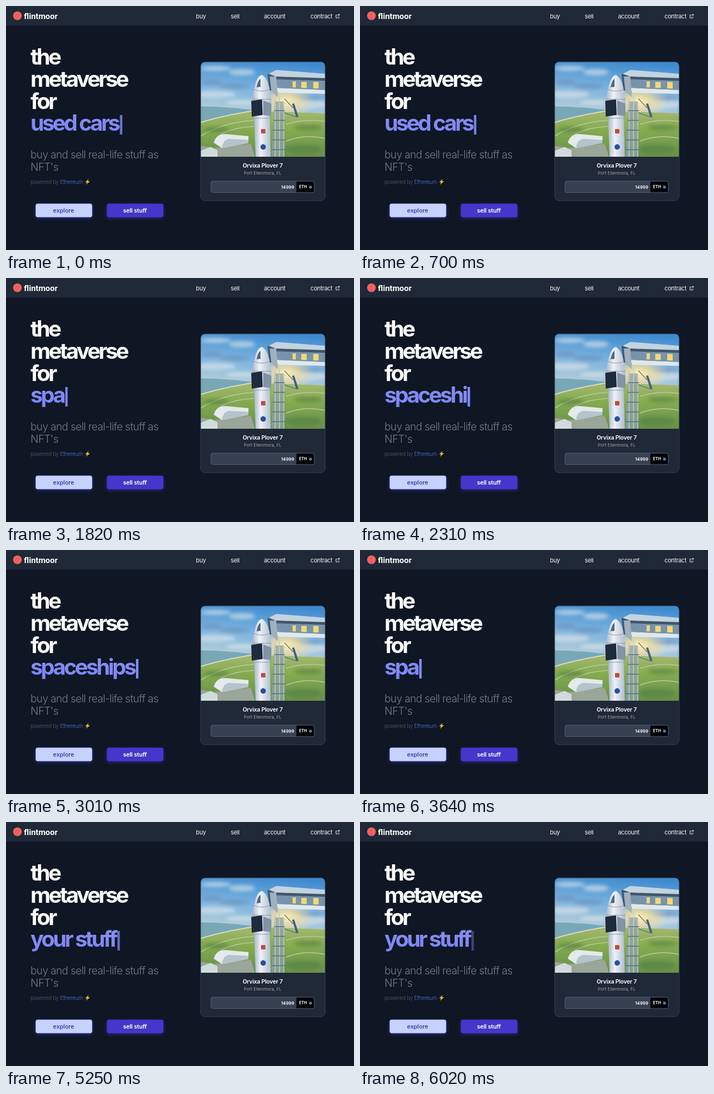
Recreate the animation shown at these times as an HTML page. Size 640 by 450 pixels, loop 6.09 s.

```html
<!DOCTYPE html>
<html lang="en">
<head>
<meta charset="utf-8">
<title>Marketplace landing page</title>
<style>
html, body { margin: 0; width: 100%; height: 100%; overflow: hidden; background: #0f1624; }
svg { display: block; width: 640px; height: 450px; font-family: Inter, "Open Sans", sans-serif; font-optical-sizing: none; }
text { white-space: pre; }
.nav { font-size: 11px; letter-spacing: -.035em; fill: #f3f4f6; }
.brand { font: 700 15px Roboto, sans-serif; fill: #fff; }
.hero { font-size: 40.5px; font-weight: 700; letter-spacing: -.088em; fill: #fff; }
.lead { font-size: 19.5px; font-weight: 300; letter-spacing: -.034em; fill: #737a88; }
.note { font-size: 10px; font-weight: 300; letter-spacing: -.03em; fill: #535d6c; }
.button { font-size: 11px; font-weight: 500; letter-spacing: -.02em; text-anchor: middle; }
.button rect { filter: drop-shadow(0 2px 3px #312ea8c0); }
.title { font-size: 10.5px; font-weight: 600; letter-spacing: -.02em; fill: #fff; text-anchor: middle; }
.place { font-size: 8px; fill: #9ca3af; text-anchor: middle; }
.price { font-size: 8px; font-weight: 600; fill: #fff; text-anchor: end; }
.unit { font-size: 7px; font-weight: 700; fill: #fff; }
</style>
</head>
<body>
<svg viewBox="0 0 640 450">
  <defs>
    <linearGradient id="sky" x1=".6" y1="0" x2=".4" y2="1">
      <stop offset="0" stop-color="#3f8bd0"/>
      <stop offset=".5" stop-color="#7db4df"/>
      <stop offset="1" stop-color="#c3d4d8"/>
    </linearGradient>
    <linearGradient id="land" x1="0" y1="0" x2="0" y2="1">
      <stop offset="0" stop-color="#a9b972"/>
      <stop offset=".4" stop-color="#86ad50"/>
      <stop offset="1" stop-color="#67904a"/>
    </linearGradient>
    <linearGradient id="hull">
      <stop offset="0" stop-color="#a4b5c9"/>
      <stop offset=".4" stop-color="#eef2f7"/>
      <stop offset="1" stop-color="#aebdce"/>
    </linearGradient>
    <linearGradient id="ink" x1="0" y1="0" x2="0" y2="1">
      <stop offset="0" stop-color="#8c8fee"/>
      <stop offset="1" stop-color="#7c84f7"/>
    </linearGradient>
    <radialGradient id="sun">
      <stop offset="0" stop-color="#fff0b4"/>
      <stop offset=".45" stop-color="#f5dc98" stop-opacity=".7"/>
      <stop offset="1" stop-color="#f0dca0" stop-opacity="0"/>
    </radialGradient>
    <filter id="soft"><feGaussianBlur stdDeviation="3"/></filter>
    <clipPath id="frame"><path d="M358 278V111a8 8 0 0 1 8-8H579a8 8 0 0 1 8 8V278Z"/></clipPath>
  </defs>

  <rect width="640" height="450" fill="#0f1624"/>
  <rect width="640" height="36" fill="#1f2937"/>
  <circle cx="21" cy="18" r="8" fill="#f0625f"/>
  <text class="brand" x="33" y="23.5">flintmoor</text>
  <g class="nav">
    <text x="349.3" y="22.5">buy</text>
    <text x="413.3" y="22.5">sell</text>
    <text x="474.5" y="22.5">account</text>
    <text x="560" y="22.5">contract</text>
  </g>
  <path d="M609 16.5H606.8V22H612.3V19.8M610.3 15.5H613V18.2M613 15.5L609 19.5" fill="none" stroke="#e5e7eb"/>

  <g class="hero">
    <text x="45" y="108">the</text>
    <text x="45" y="149">metaverse</text>
    <text x="45" y="190">for</text>
    <text id="word" x="45" y="230" fill="url(#ink)"></text>
  </g>
  <rect id="caret" y="201" width="4.5" height="36" fill="#818cf8"/>

  <g class="lead">
    <text x="45" y="281">buy and sell real-life stuff as</text>
    <text x="45" y="304">NFT's</text>
  </g>
  <text class="note" x="45" y="328">powered by <tspan fill="#4a76dc">Ethereum</tspan></text>
  <path d="M152 319L145.5 325.2H149.2L147 329.7L154.6 323.3H150.6Z" fill="#fbb040"/>

  <g class="button">
    <rect x="54.5" y="364.5" width="104" height="25" rx="4" fill="#c7d2fe"/>
    <text x="106" y="381" fill="#3730a3" letter-spacing="0">explore</text>
    <rect x="185.5" y="364.5" width="104" height="25" rx="4" fill="#4338ca"/>
    <text x="237" y="381" fill="#fff" font-weight="600">sell stuff</text>
  </g>

  <rect x="358" y="103" width="229" height="256" rx="8" fill="#1f2937"/>
  <g clip-path="url(#frame)">
    <rect x="358" y="103" width="229" height="105" fill="url(#sky)"/>
    <g filter="url(#soft)">
      <g fill="#e0e6ea" opacity=".6">
        <ellipse cx="386" cy="115" rx="28" ry="5"/>
        <ellipse cx="434" cy="122" rx="24" ry="6"/>
        <ellipse cx="384" cy="163" rx="38" ry="7"/>
        <ellipse cx="436" cy="178" rx="32" ry="5"/>
        <ellipse cx="548" cy="181" rx="46" ry="9"/>
      </g>
      <g fill="#6a8eb4" opacity=".6">
        <ellipse cx="378" cy="141" rx="20" ry="5"/>
        <ellipse cx="420" cy="148" rx="28" ry="5"/>
        <ellipse cx="560" cy="171" rx="25" ry="4"/>
      </g>
    </g>
    <ellipse cx="512" cy="176" rx="55" ry="34" fill="url(#sun)"/>

    <path d="M358 190L470 194L587 198V278H358Z" fill="url(#land)"/>
    <path d="M358 185Q410 186 456 192L420 201Q388 206 358 215Z" fill="#78a8b8"/>
    <path d="M358 215Q390 204 456 193" fill="none" stroke="#ddd9bd" stroke-width="2"/>
    <g fill="none" stroke="#bfc6a8" stroke-width="1.5">
      <path d="M358 240Q400 214 456 211M395 236Q420 224 456 222"/>
      <path d="M515 218Q550 207 587 213M515 249Q548 236 587 244"/>
    </g>
    <g fill="#557f42" opacity=".6" filter="url(#soft)">
      <ellipse cx="387" cy="228" rx="24" ry="5"/>
      <ellipse cx="556" cy="224" rx="26" ry="5"/>
      <ellipse cx="546" cy="264" rx="34" ry="9"/>
    </g>
    <path d="M358 258L385 262L450 254L458 278H358Z" fill="#9ba69a"/>
    <path d="M382 252Q387 236 402 236L446 240V252L397 262Z" fill="#e4eaeb"/>
    <path d="M397 262Q399 247 410 245L446 247V253Z" fill="#b4c4cc"/>
    <path d="M358 267L376 260L389 266V278H358Z" fill="#d2dbdc"/>

    <!-- service tower -->
    <path d="M494 176H511V278H488Z" fill="#8fa2a8" opacity=".75"/>
    <path d="M495 170V278M503 165V278M511 176V278" stroke="#c0cdd0" stroke-width="1.5"/>
    <path d="M493 193H513M492 211H513M490 229H513M489 247H513M488 265H513" stroke="#5c7078" stroke-width="1.5"/>
    <path d="M528 180L536 205" stroke="#3f6380" stroke-width="4"/>
    <path d="M512 171L528 188M512 197L535 205" stroke="#657c8e" stroke-width="1.5"/>

    <!-- access arm -->
    <path d="M481 126L494 120L587 128V160L498 160L484 155Z" fill="#40566d"/>
    <path d="M483 125L497 118L587 125V133L496 130Z" fill="#c3d3df"/>
    <path d="M495 135L587 138V155L496 151Z" fill="#7894ab"/>
    <path d="M527 139h6v11h-6zM543 140h10v11h-10zM565 140h10v12h-10z" fill="#f0d777"/>
    <path d="M497 151L587 155V162L500 160Z" fill="#e0e8ec"/>
    <path d="M485 130L497 130L500 168L488 158Z" fill="#a0b1be"/>

    <!-- rocket -->
    <path d="M456 200H485L487 278H459Z" fill="url(#hull)"/>
    <path d="M452 174L456 154C458 140 464 129 470 127C477 129 483 141 485 154L488 174V203H453Z" fill="url(#hull)"/>
    <path d="M451 175L471 172L472 201L452 204Z" fill="#1d2b3c"/>
    <path d="M473 174L488 180V203L473 201Z" fill="#8293a6"/>
    <path d="M456 154Q470 160 485 154M453 172H488M456 207H486" fill="none" stroke="#8797a8"/>
    <path d="M461 150Q463 138 468 134V149Z" fill="#53687c"/>
    <rect x="469" y="227" width="8" height="8" fill="#c5483f"/>
    <circle cx="473" cy="260" r="5" fill="#284f9c"/>
  </g>
  <rect x="358" y="103" width="229" height="256" rx="8" fill="none" stroke="#374151"/>

  <text class="title" x="472" y="298">Orvixa Plover 7</text>
  <text class="place" x="472" y="311">Port Ellenmora, FL</text>
  <rect x="377" y="323" width="190" height="21" rx="3" fill="#374151"/>
  <path d="M534 323H564a3 3 0 0 1 3 3V341a3 3 0 0 1-3 3H534Z" fill="#030407"/>
  <rect x="377" y="323" width="190" height="21" rx="3" fill="none" stroke="#596273"/>
  <text class="price" x="530" y="336.5">14999</text>
  <text class="unit" x="539" y="336.3">ETH</text>
  <circle cx="560" cy="334" r="2.8" fill="#65738f"/>
</svg>
<script>
const LOOP = 6090, STEP = 70, TYPE = 100, ERASE = 50, BLINK = 680;
const words = [
  { text: 'used cars', start: -2000, erase: 850 },
  { text: 'spaceships', start: 1500, erase: 3270 },
  { text: 'your stuff', start: 4010, erase: LOOP }
];
const word = document.getElementById('word');
const caret = document.getElementById('caret');
const clamp = (v, lo, hi) => Math.min(hi, Math.max(lo, v));

function typed(t) {
  const { text, start, erase } = words.findLast(w => t >= w.start);
  const shown = Math.floor((t - start) / TYPE);
  const erased = Math.max(0, Math.floor((t - erase) / ERASE));
  return text.slice(0, clamp(Math.min(shown, text.length) - erased, 0, text.length));
}

function caretOpacity(t) {
  const phase = (t + BLINK - 240) % BLINK;
  const fromPeak = Math.min(phase, BLINK - phase);
  return 1 - .6 * clamp((fromPeak - 205) / 100, 0, 1);
}

function draw(now) {
  const t = Math.floor(now % LOOP / STEP) * STEP;
  const text = typed(t);
  word.textContent = text;
  caret.setAttribute('x', 45 + (text ? word.getComputedTextLength() + 2.5 : 0));
  caret.setAttribute('opacity', caretOpacity(t));
  requestAnimationFrame(draw);
}
draw(performance.now());
</script>
</body>
</html>
```
